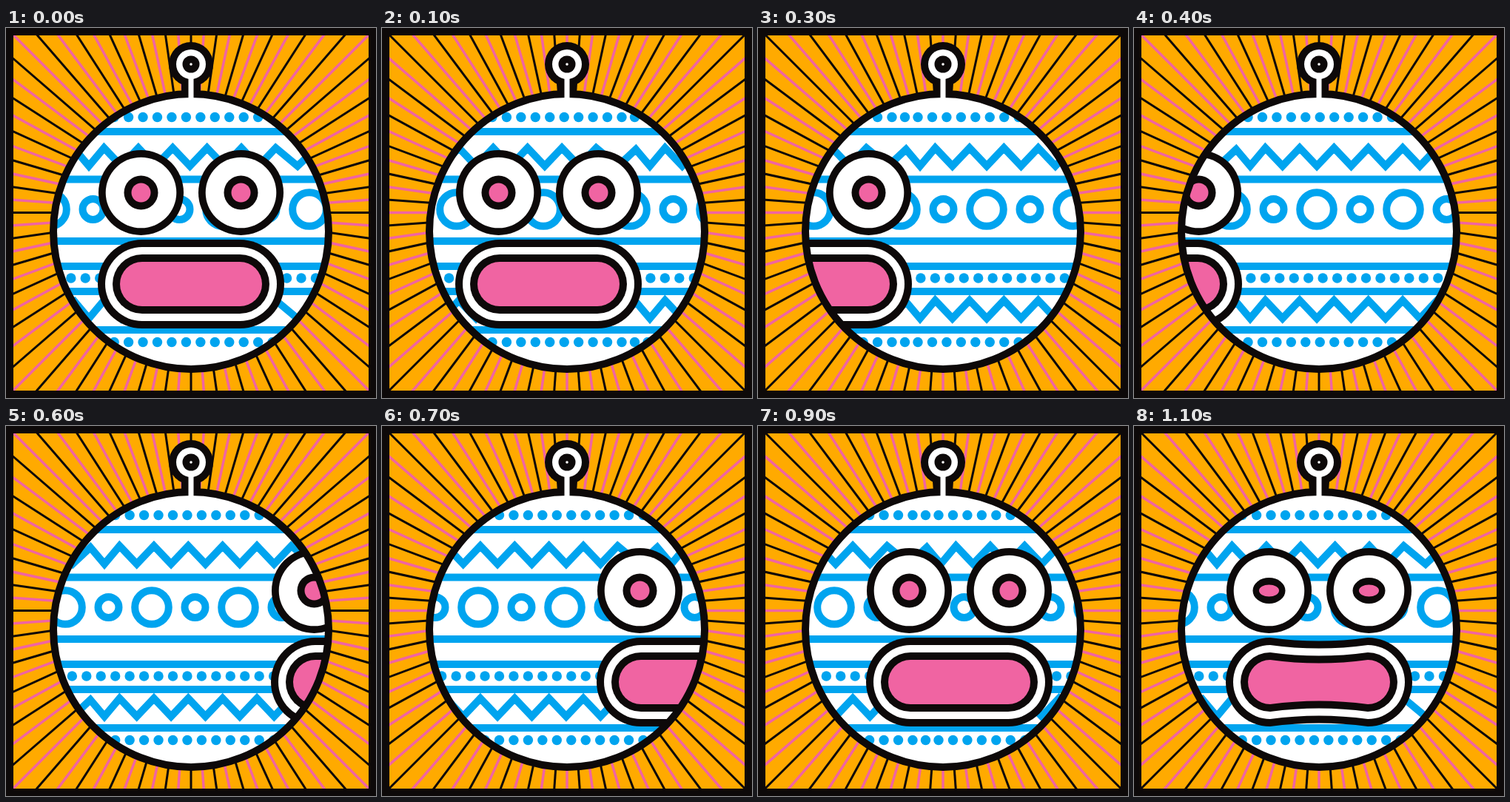
An HTML page with a canvas for the animation above (1200 ms loop, 500 by 500 pixels).

```html
<!DOCTYPE html>
<html lang="en">
<head>
<meta charset="utf-8">
<title>Spinning robot head</title>
<style>
html, body { margin: 0; width: 100%; height: 100%; overflow: hidden; background: #0d0909; }
canvas { display: block; }
</style>
</head>
<body>
<canvas id="stage" width="500" height="500"></canvas>
<script>
const ctx = document.getElementById('stage').getContext('2d');
const BLACK = '#0d0909', WHITE = '#fff', ORANGE = '#ffaa00', PINK = '#f064a2', BLUE = '#00a4ef';
const STEP = 100, RAYS = 88;

// One pose per step: face shift, pattern anchor, squint
const poses = [
  [0, 410, 0], [-25, 335, 0], [-106, 254, 0], [-168, 192, 0],
  [-230, 130, 0], [-340, 47, 0], [234, 431, 0], [166, 364, 0],
  [99.5, 298, 0], [22, 220, 0], [0, 410, 1], [0, 410, 1]
];

function disc(x, y, rx, color, ry = rx) {
  ctx.fillStyle = color;
  ctx.beginPath();
  ctx.ellipse(x, y, rx, ry, 0, 0, Math.PI * 2);
  ctx.fill();
}

function ring(x, y, r, color, width = 10) {
  ctx.strokeStyle = color;
  ctx.lineWidth = width;
  ctx.beginPath();
  ctx.arc(x, y, r, 0, Math.PI * 2);
  ctx.stroke();
}

function box(x, y, w, h, color) {
  ctx.fillStyle = color;
  ctx.fillRect(x, y, w, h);
}

function drawRays(swap) {
  for (let i = 0; i < RAYS; i++) {
    const a = i / RAYS * Math.PI * 2;
    const black = i % 2 === swap;
    ctx.strokeStyle = black ? BLACK : PINK;
    ctx.lineWidth = black ? 3 : 3.5;
    ctx.beginPath();
    ctx.moveTo(250, 249.5);
    ctx.lineTo(250 + 400 * Math.cos(a), 249.5 + 400 * Math.sin(a));
    ctx.stroke();
  }
}

function drawZigzag(anchor, top) {
  const low = top + 24.5;
  ctx.strokeStyle = BLUE;
  ctx.lineWidth = 10;
  ctx.lineJoin = 'miter';
  ctx.beginPath();
  // Each run has one uneven tooth followed by six even ones
  for (let x = anchor + 8 - 650; x < 600; x += 325) {
    ctx.lineTo(x - 24, low);
    ctx.lineTo(x, top + 2);
    ctx.lineTo(x + 19, low);
    for (let k = 0; k < 6; k++) {
      const peak = x + 39.5 + k * 46.4;
      ctx.lineTo(peak, top);
      if (k < 5) ctx.lineTo(peak + 23.2, low);
    }
  }
  ctx.stroke();
}

function drawPattern(anchor) {
  for (const y of [140, 204.5, 288, 322, 356, 408]) box(50, y - 5, 400, 10, BLUE);
  for (let k = -4; k <= 4; k++) {
    ring(anchor + k * 117, 245, 22.8, BLUE);
    ring(anchor + k * 117 - 58.5, 245, 14, BLUE);
  }
  for (let k = -22; k <= 22; k++) {
    const x = anchor - 11 + k * 19.45;
    disc(x, 338, 6.7, BLUE);
    const squeeze = Math.min(Math.max(k, 0), 2) * 1.95;
    for (const y of [120.5, 424.5]) disc(x - squeeze, y, 6.7, BLUE);
  }
  drawZigzag(anchor, 162);
  drawZigzag(anchor, 368);
}

function drawLips(r, bend, color) {
  ctx.fillStyle = color;
  ctx.beginPath();
  ctx.arc(184, 346, r, Math.PI / 2, Math.PI * 1.5);
  ctx.quadraticCurveTo(250, 346 - r + bend * 2, 316, 346 - r);
  ctx.arc(316, 346, r, -Math.PI / 2, Math.PI / 2);
  ctx.quadraticCurveTo(250, 346 + r - bend * 2, 184, 346 + r);
  ctx.fill();
}

function drawFace(shift, squint) {
  ctx.save();
  ctx.translate(shift, 0);
  for (const x of [182.5, 317.5]) {
    disc(x, 222.5, 57.5, BLACK);
    disc(x, 222.5, 47.8, WHITE);
    disc(x, 222.5, 23 - squint, BLACK, 23 - squint * 5.5);
    disc(x, 222.5, 13 + squint * 0.5, PINK, 13 - squint * 5);
  }
  [[60, BLACK], [50, WHITE], [40, BLACK], [30, PINK]]
    .forEach(([r, color]) => drawLips(r, squint * 4.5, color));
  ctx.restore();
}

function drawHead(shift, anchor, squint) {
  disc(250, 49, 30, BLACK);
  box(237, 65, 26, 25, BLACK);
  ctx.save();
  ctx.beginPath();
  ctx.arc(250, 275, 186, 0, Math.PI * 2);
  ctx.clip();
  box(0, 0, 500, 500, WHITE);
  drawPattern(anchor);
  drawFace(shift, squint);
  ctx.restore();
  ring(250, 275, 186, BLACK);
  box(246.5, 64, 7, 32, WHITE);
  disc(250, 49, 20, WHITE);
  disc(250, 49, 11.5, BLACK);
  disc(250, 49, 1.8, WHITE);
}

function draw(now) {
  const i = Math.floor(now / STEP) % poses.length;
  box(0, 0, 500, 500, ORANGE);
  drawRays(i % 2);
  ctx.strokeStyle = BLACK;
  ctx.lineWidth = 10;
  ctx.strokeRect(5, 5, 490, 490);
  drawHead(...poses[i]);
}

const start = performance.now();
function tick() {
  draw(performance.now() - start);
  requestAnimationFrame(tick);
}
tick();
</script>
</body>
</html>
```
